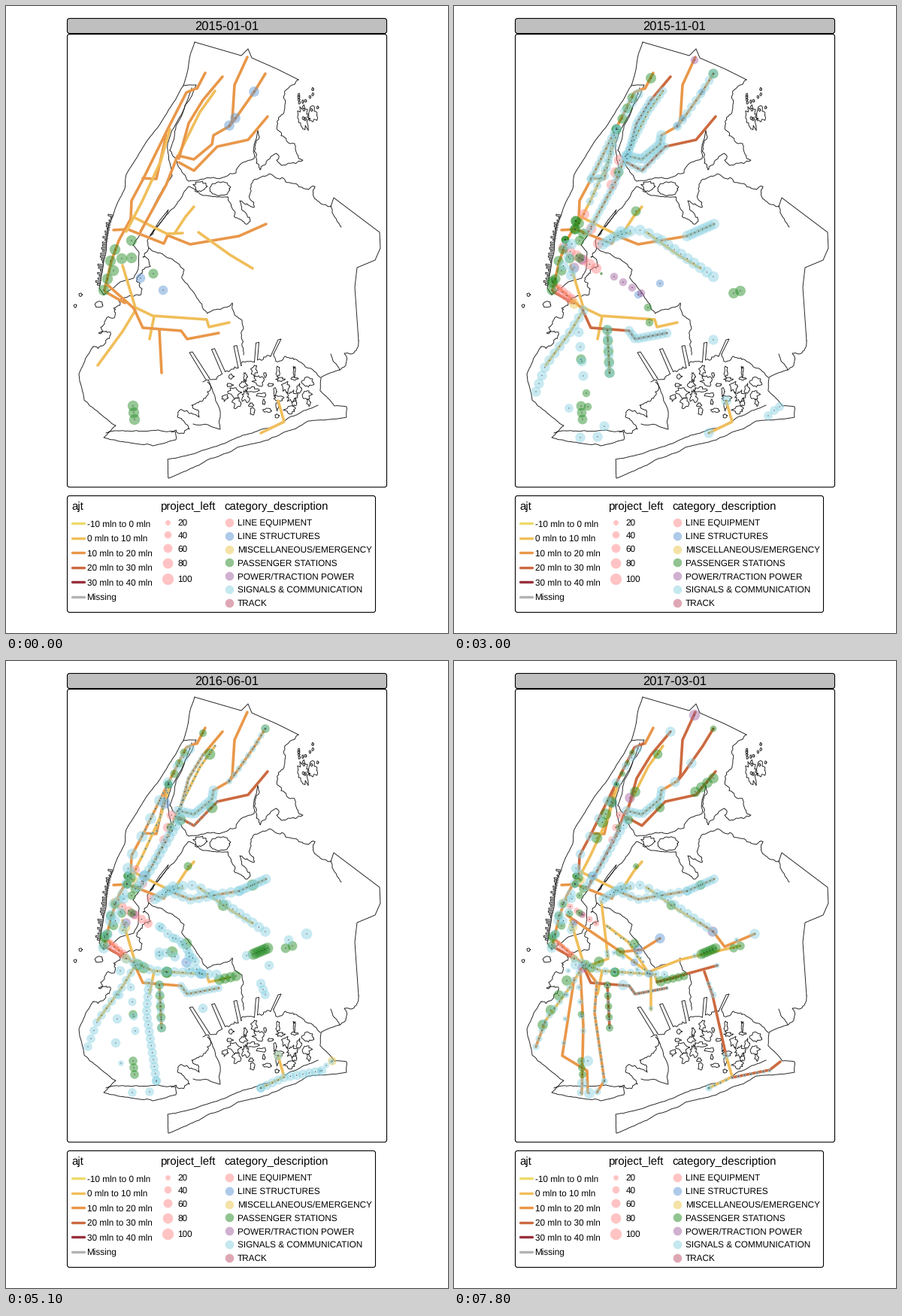
These frames come from a looping animation (588x834 px, 8000 ms). A matplotlib script:

```python
import numpy as np
import matplotlib.pyplot as plt
from matplotlib.animation import FuncAnimation
from matplotlib.colors import to_rgba
from matplotlib.patches import FancyBboxPatch

W, H, DPI = 588, 834, 64
PT = 72 / DPI  # points per pixel
plt.rcParams["font.family"] = "Liberation Sans"
plt.rcParams["text.hinting"] = "none"
rng = np.random.default_rng(7)

fig = plt.figure(figsize=(W / DPI, H / DPI), dpi=DPI, facecolor="white")
ax = fig.add_axes([0, 0, 1, 1])
ax.set(xlim=(0, W), ylim=(H, 0))
ax.axis("off")

AMOUNTS = {"-10 mln to 0 mln": "#ecdb6a", "0 mln to 10 mln": "#f0be5a",
           "10 mln to 20 mln": "#e99749", "20 mln to 30 mln": "#cc6a40",
           "30 mln to 40 mln": "#98303c", "Missing": "#b3b3b3"}
CATEGORIES = {"LINE EQUIPMENT": "#ff8888", "LINE STRUCTURES": "#5f97d6",
              "MISCELLANEOUS/EMERGENCY": "#ebc750",
              "PASSENGER STATIONS": "#228b22",
              "POWER/TRACTION POWER": "#a262a0",
              "SIGNALS & COMMUNICATION": "#8ad2e2", "TRACK": "#c0506a"}
SHADES = list(AMOUNTS.values())
TINTS = list(CATEGORIES.values())
YELLOW, ORANGE, RED = 1, 2, 3
EQUIP, STRUCT, MISC, STATION, POWER, SIGNAL, TRACK = range(7)


# ---------- frame and legend ----------
def box(x0, y0, x1, y1, fill="white"):
    ax.add_patch(FancyBboxPatch((x0, y0), x1 - x0, y1 - y0, fc=fill, ec="black",
                                boxstyle="round,pad=0,rounding_size=3", lw=1.1 * PT))


def label(x, y, text, size=11.7, **kw):
    return ax.text(x, y, text, fontsize=size * PT, va="baseline", **kw)


def disc(x, y, r, color):
    ax.scatter(x, y, s=(2 * r * PT) ** 2, color=color, alpha=.5, lw=0)


box(81.5, 16.5, 506.5, 36.5, "#c0bfc0")
box(81.5, 37.5, 506.5, 640)
box(81.5, 651.5, 491.5, 806.5)
title = label(293.5, 33, "", 16.6, ha="center")
for x, name in (87, "ajt"), (205, "project_left"), (290, "category_description"):
    label(x, 669.5, name, 15)
for i, (name, color) in enumerate(AMOUNTS.items()):
    y = 688 + 19.6 * i
    ax.plot([88, 104], [y, y], color=color, lw=3.4 * PT, solid_capstyle="round")
    label(107.5, y + 4.5, name)
for i, size in enumerate(range(20, 101, 20)):
    y = 686.5 + 15.8 * i + .75 * i * i
    disc(215, y, .76 * size ** .5, TINTS[EQUIP])
    label(228.5, y + 4.5, size)
for i, (name, color) in enumerate(CATEGORIES.items()):
    y = 687 + 17.8 * i
    disc(297, y, 5.8, color)
    label(308, y + 4.2, name)


# ---------- coast ----------
def points(flat):
    return np.array(flat, float).reshape(-1, 2)


def along(flat, n):
    """n points spread evenly along a path."""
    p = points(flat)
    d = np.r_[0, np.cumsum(np.hypot(*np.diff(p, axis=0).T))]
    t = np.linspace(0, d[-1], n)
    return np.c_[np.interp(t, d, p[:, 0]), np.interp(t, d, p[:, 1])]


def coast(flat, rough=0.):
    """Outline through a few points, roughened by midpoint displacement."""
    p = points(flat)
    while rough and np.hypot(*np.diff(p, axis=0).T).max() > 5:
        step = np.diff(p, axis=0)
        normal = step[:, ::-1] * (1, -1)
        mid = p[:-1] + step / 2 + normal * rng.normal(0, rough, (len(step), 1))
        p = np.vstack([np.stack([p[:-1], mid], 1).reshape(-1, 2), p[-1:]])
    ax.plot(*p.T, color="#222222", lw=.95 * PT, solid_joinstyle="round")


def island(x, y, rx, ry, rough=.25):
    t = np.linspace(0, 2 * np.pi, 8 + int(rx + ry))
    r = 1 + rng.uniform(-rough, rough, len(t))
    r[-1] = r[0]
    coast(np.c_[x + rx * r * np.cos(t), y + ry * r * np.sin(t)])


# northern border, Bronx shore, both sides of the Harlem River
coast([251, 48, 313, 66, 322, 57, 327, 69, 361, 84, 389, 98])
coast([389, 98, 371, 113, 370, 141, 362, 152, 363, 166, 384, 183, 395, 205, 366, 212,
       360, 196, 338, 218, 333, 209, 335, 166], .14)
coast([335, 166, 330, 203, 306, 222, 276, 228, 243, 233, 229, 213, 218, 192], .1)
coast([218, 192, 226, 160, 253, 105, 236, 106], .03)
coast([247, 109, 221, 165, 215, 183, 221, 226, 183, 294, 169, 318, 177, 328, 176, 350,
       170, 362, 152, 367, 130, 384], .03)
coast([251, 48, 236, 106, 188, 179, 160, 224, 158, 243, 137, 290, 124, 375, 130, 384],
      .02)
for t in np.linspace(0, 1, 26):  # river piers
    x, y, out = 142 - 17 * t ** .8, 278 + 92 * t, rng.uniform(1, 7)
    coast([x, y, x - out, y - 1, x - out, y + 1, x, y + 2])
coast([192, 305, 204, 286, 216, 271, 214, 277, 203, 292, 192, 305])
# Queens and the eastern border
coast([190, 322, 188, 312, 216, 276, 243, 240, 262, 252, 295, 254], .06)
coast([295, 254, 312, 284, 321, 290, 324, 281, 311, 259, 330, 268, 325, 243, 360, 229,
       394, 241, 411, 240, 409, 253, 432, 266, 446, 294], .12)
coast([432, 267, 436, 255, 497, 301, 498, 322, 491, 338, 467, 348, 464, 374, 469, 445])
coast([469, 445, 466, 458, 450, 462, 452, 478, 444, 484, 432, 463], .08)
coast([444, 484, 419, 494, 418, 512, 437, 532, 453, 533, 453, 547, 402, 552, 330, 582,
       246, 615, 216, 628, 215, 603, 240, 598, 340, 563, 415, 531], .03)
coast([190, 322, 222, 337, 237, 351, 234, 362, 268, 409, 301, 395, 304, 411, 314, 418,
       316, 464], .06)
# Brooklyn
coast([190, 322, 185, 348, 176, 360, 181, 376, 152, 395, 145, 412, 123, 435, 139, 434,
       128, 452, 116, 453], .2)
coast([116, 453, 97, 490, 104, 524, 136, 551, 146, 558, 130, 574, 195, 585, 226, 577,
       225, 566, 133, 568], .04)
coast([262, 500, 266, 520, 247, 531, 257, 547, 228, 546, 244, 563, 220, 567], .2)
coast([249, 556, 285, 563, 285, 540, 268, 500], .05)
# bay shore with canals reaching inland
feet = np.linspace((266, 497), (352, 466), 5)
tips = np.linspace((244, 461), (362, 444), 5)
for foot, tip, after in zip(feet, tips, [*feet[1:], (383, 470)]):
    coast([*foot, *tip, *(tip + (4, -1)), *(foot + (4, -3))])
    coast([*(foot + (4, -3)), *after], .2)
coast([383, 470, 400, 481, 418, 494], .1)
for k in range(34):  # marsh islands on a sunflower spiral
    d, a = np.sqrt((k + .5) / 34), 2.4 * k
    island(350 + 64 * d * np.cos(a), 513 + 33 * d * np.sin(a),
           *rng.uniform(1.2, 7, 2), .45)
island(285, 243, 13, 9, .12)
island(258, 240, 8, 7)
island(124, 397, 5, 4)
island(99, 384, 2, 2)
island(92, 399, 2, 2)
island(396, 150, 7, 15, .4)
island(408, 145, 5, 9, .4)
for x, y in rng.uniform((388, 108), (421, 156), (14, 2)):
    island(x, y, 1.2, 2)


# ---------- subway lines ----------
INWOOD = [265, 89, 254, 110]
WEST = [252, 110, 240, 115, 216, 162, 182, 231, 167, 259, 166, 283]
DOWNTOWN = [166, 283, 150, 312, 140, 340, 131, 378]
SIXTH = [218, 164, 206, 206, 181, 260, 160, 300]
EIGHTH = [213, 172, 200, 230, 182, 229]
CONCOURSE = [288, 94, 262, 125, 243, 156, 230, 203]
JEROME = [278, 113, 258, 141, 238, 181, 230, 197]
WHITE_PLAINS = [321, 68, 304, 105, 301, 152, 297, 160]
PARK = [345, 90, 331, 113, 305, 150, 297, 160]
LOOP = [297, 160, 276, 172, 274, 184, 250, 204, 229, 199]
PELHAM = [348, 147, 322, 178, 281, 187, 250, 219, 230, 208]
LEX = [228, 200, 213, 238, 179, 300]
CROSSTOWN = [168, 280, 214, 303, 235, 302]
ASTORIA = [224, 303, 239, 280, 250, 267]
TUNNEL = [143, 298, 162, 297, 210, 316, 215, 305]
FLUSHING = [215, 305, 245, 317, 310, 306, 346, 290]
BOULEVARD = [256, 301, 298, 331, 328, 349]
JAMAICA = [328, 349, 345, 360, 360, 380, 400, 363]
FULTON = [155, 345, 172, 401, 195, 412, 267, 417, 270, 427, 297, 421]
EASTERN = [170, 402, 182, 428, 233, 432, 241, 443, 283, 435]
NOSTRAND = [204, 431, 207, 488]
FOURTH = [172, 405, 155, 433, 122, 478]
BAY_RIDGE = [122, 478, 109, 513]
CULVER = [172, 405, 190, 428, 187, 468, 200, 558, 190, 574]
WEST_END = [168, 410, 172, 485, 170, 576]
SEA_BEACH = [160, 422, 144, 525, 177, 545, 178, 574]
CANARSIE = [203, 352, 232, 374, 262, 420, 262, 464]
MYRTLE = [150, 338, 222, 387, 250, 384, 274, 369]
BROADWAY = [222, 387, 258, 414, 302, 397, 380, 379]
LIBERTY = [270, 427, 350, 405]
CROSS_BAY = [333, 413, 344, 445, 362, 525]
ISLAND = [362, 525, 370, 553, 339, 568]
ROCKAWAY = [370, 554, 420, 544, 434, 533]

NEVER, LATE = 99, 25  # LATE: month in which the remaining services open
routes = []


def route(base, *paths, surge=NEVER, steady=False, born=0):
    for path in paths:
        artist, = ax.plot(*points(path).T, lw=3.6 * PT, solid_capstyle="round",
                          solid_joinstyle="round", zorder=3)
        routes.append((artist, base, surge, steady, born))


route(ORANGE, INWOOD, DOWNTOWN, EIGHTH, TUNNEL, FLUSHING)
route(ORANGE, WEST, surge=LATE)
route(YELLOW, SIXTH, JEROME, CROSSTOWN, ASTORIA, BOULEVARD, FULTON, FOURTH, ISLAND)
route(YELLOW, [197, 413, 191, 443])
route(ORANGE, CONCOURSE, EASTERN, surge=8)
route(ORANGE, WHITE_PLAINS, PARK, LEX, NOSTRAND, surge=12)
route(ORANGE, LOOP)
route(ORANGE, PELHAM, surge=3, steady=True)
route(ORANGE, [132, 380, 158, 395], surge=8, steady=True)
route(ORANGE, [134, 370, 170, 402])
route(YELLOW, [196, 320, 205, 396, 180, 405], CANARSIE, BROADWAY, born=LATE)
route(ORANGE, MYRTLE, JAMAICA, CULVER, WEST_END, SEA_BEACH, BAY_RIDGE, born=LATE)
route(RED, LIBERTY, CROSS_BAY, ROCKAWAY, born=LATE)


def shade_at(month, base, surge, steady):
    """Spending rises with a surge, which pauses for a few months unless steady."""
    lull = 17 <= month < 22 and not steady
    if base == YELLOW:
        return base
    return base + (base == ORANGE and month >= surge and not lull)


# ---------- projects ----------
places, tints, spans = [], [], []


def dots(kind, path, start, end, n=0, jitter=0):
    """Projects at the path's points, or n of them spread along it."""
    pts = along(path, n) if n else points(path)
    for p in pts + rng.normal(0, jitter, pts.shape):
        places.append(p)
        tints.append(to_rgba(TINTS[kind], .47))
        spans.append((start, end))


dots(EQUIP, [220, 205, 210, 238], 8, 38, 3)
dots(EQUIP, [173, 277, 192, 316], 8, 26, 3)
dots(EQUIP, [146, 321, 189, 349], 8, 34, 6)
dots(EQUIP, [138, 376, 156, 390], 8, 36, 4)
dots(STRUCT, [330, 114, 305, 149, 297, 159], -3, 18)
dots(STRUCT, [179, 362, 209, 378], -3, 8)
dots(STRUCT, [274, 369, 245, 384], 3, 17)
dots(STRUCT, [274, 369, 245, 384], 22, 45)
dots(STRUCT, [240, 401, 260, 416], 12, 40)
dots(STRUCT, [211, 189, 184, 286], 17, 45)
dots(MISC, [160, 396], 3, 50)
dots(MISC, [362, 525, 434, 532], 12, 25)
dots(MISC, [146, 322, 168, 291, 158, 354], 17, 50)
dots(POWER, [320, 72], 3, 17)
dots(POWER, [320, 72], LATE, 50)
dots(POWER, [170, 337, 160, 348], 3, 40)
dots(POWER, [213, 360, 249, 382], 3, 17, 4)
dots(POWER, [234, 182, 171, 408, 344, 360], 22, 45)

dots(STATION, [167, 312, 145, 324, 154, 336, 167, 335], -3, 45)
dots(STATION, [139, 339, 143, 352, 135, 363, 130, 378], -3, 60)
dots(STATION, [196, 356], -3, 11)
dots(STATION, [169, 532, 171, 550], -3, 50, 3)
dots(STATION, [178, 533, 176, 515], 3, 17)
dots(STATION, [216, 164] * 3, 3, 32)
dots(STATION, [162, 286, 161, 297] * 2, 3, 40)
dots(STATION, [172, 303, 166, 289, 131, 366, 131, 368], 3, 60)
dots(STATION, [148, 311] * 3, 3, 17)
dots(STATION, [237, 122, 224, 150], 3, 35, 3)
dots(STATION, [262, 96], 8, 25)
dots(STATION, [219, 221, 242, 273], 3, 35)
dots(STATION, [372, 382, 381, 379], 3, 60)
dots(STATION, [258, 401, 260, 421], 3, 17)
dots(STATION, NOSTRAND, 3, 45, 5)
dots(STATION, [169, 470, 345, 90], 3, 38)
dots(STATION, [284, 424, 306, 419], 12, 45, 4)
dots(STATION, [329, 390, 348, 382] * 2, 17, 60, 6)
dots(STATION, [271, 124, 328, 298, 289, 325, 221, 387, 240, 376], 17, 50)
dots(STATION, [214, 414, 214, 414, 183, 408, 175, 404, 274, 195, 232, 211], 17, 50)
dots(STATION, [321, 174, 345, 156], 22, 50, 4)
dots(STATION, [150, 425, 118, 484], 22, 50, 4)
dots(STATION, [193, 400, 241, 174, 275, 426], 22, 50)
dots(STATION, [211, 188, 190, 234], LATE, 60, 4, 2)

# resignalling spreads along whole lines
for path, n in (WEST[4:8], 11), (SIXTH[:6], 10), (EIGHTH, 8), (JEROME, 15), (LEX, 16):
    dots(SIGNAL, path, 3, 18, n)
dots(SIGNAL, CONCOURSE[2:], 3, 20, 15)
dots(SIGNAL, PARK, 3, 24, 9)
dots(SIGNAL, PELHAM[4:], 3, 18, 9)
dots(SIGNAL, LOOP[2:], 3, 70, 12)
dots(SIGNAL, [228, 140, 245, 117], 3, 50, 3)
dots(SIGNAL, [288, 94, 316, 136, 294, 161], 22, 45)
dots(SIGNAL, [230, 211, 195, 272, 176, 300], 17, 45, 13)
dots(SIGNAL, WEST[4:], 17, 50, 6)
dots(SIGNAL, DOWNTOWN, 17, 60, 8, 4)
dots(SIGNAL, [150, 318, 157, 362], 3, 50, 6, 4)
dots(SIGNAL, FLUSHING[4:], 3, 70, 8)
dots(SIGNAL, FLUSHING[:6], 12, 60, 10)
dots(SIGNAL, [198, 317, 215, 306, 229, 302], 3, 80, 7)
dots(SIGNAL, [222, 300, 251, 298, 270, 309], 8, 70, 5)
dots(SIGNAL, [276, 312, 345, 360], 8, 70, 9)
dots(SIGNAL, [400, 363], 17, 70)
dots(SIGNAL, FOURTH + BAY_RIDGE, 3, 40, 12)
dots(SIGNAL, [166, 434, 172, 492], 3, 35, 4)
dots(SIGNAL, [168, 574, 191, 573, 200, 559, 345, 444, 362, 525, 339, 568], 3, 40)
dots(SIGNAL, [153, 535, 418, 545, 426, 538, 433, 533], 3, 22)
dots(SIGNAL, [178, 532, 171, 562, 180, 575], 22, 70)
dots(SIGNAL, EASTERN[4:], 3, 30, 10)
dots(SIGNAL, NOSTRAND, 3, 30, 6)
dots(SIGNAL, [339, 568, 370, 554, 420, 545], 12, 28, 11)
dots(SIGNAL, CANARSIE[:6], 12, 27, 14, 1.5)
dots(SIGNAL, [202, 385, 240, 405], 12, 30, 6, 5)
dots(SIGNAL, [160, 396, 195, 412, 280, 417], 12, 38, 12)
dots(SIGNAL, CULVER[2:8], 12, 28, 15)
dots(SIGNAL, [152, 412, 146, 508], 12, 30, 4)
dots(SIGNAL, [320, 392, 350, 405, 339, 429, 342, 437, 376, 371, 262, 462], 12, 30)
dots(SIGNAL, [225, 431, 162, 404], 22, 60)

places = np.array(places)
start, end = np.array(spans, float).T
bubbles = ax.scatter(*places.T, c=tints, lw=0, zorder=4)
centres = ax.scatter(*places.T, c="black", alpha=.75, lw=0, zorder=5)


# ---------- motion ----------
def draw(frame):
    month = frame // 3
    title.set_text(f"{2015 + month // 12}-{month % 12 + 1:02d}-01")
    for artist, base, surge, steady, born in routes:
        artist.set_visible(month >= born)
        artist.set_color(SHADES[shade_at(month, base, surge, steady)])
    # bubble area follows the share of the project still to do
    left = np.clip((end - month) / (end - start), 0, 1) * (month >= start)
    bubbles.set_sizes((2 * 7.4 * PT) ** 2 * left)
    centres.set_sizes((1.25 * PT) ** 2 * (left > 0))
    return [title, bubbles, centres]


animation = FuncAnimation(fig, draw, frames=80, interval=100, repeat=True,
                          repeat_delay=0, blit=False)
plt.show()
```
